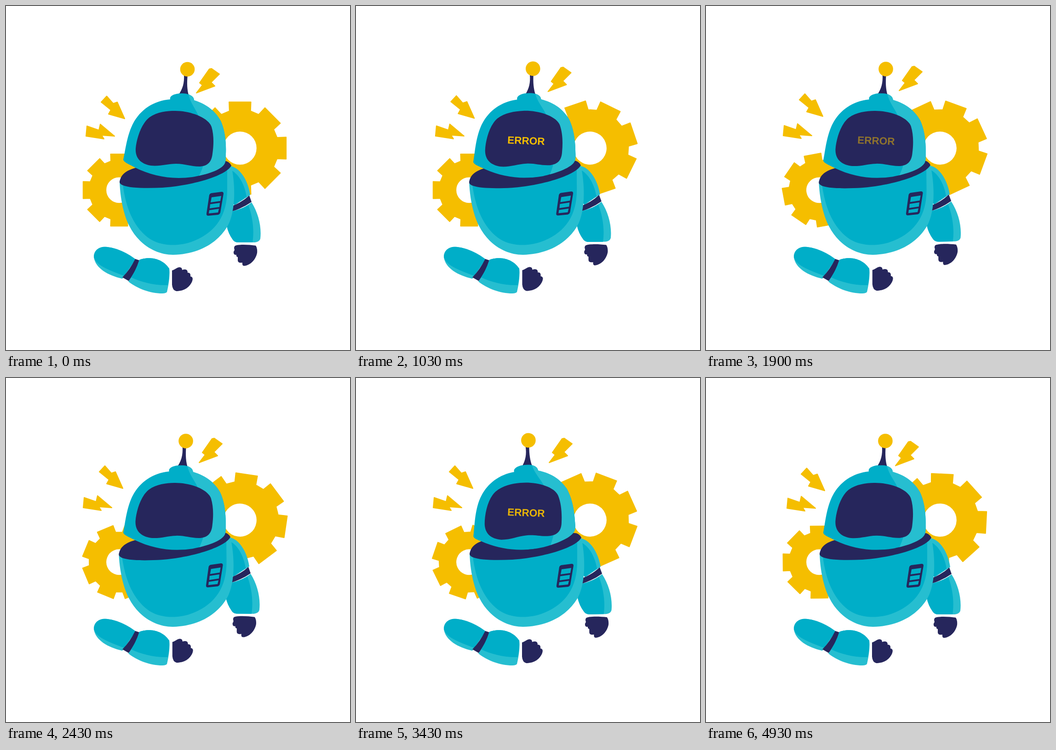
Write an HTML page that moves like this. It is 748 by 748 pixels and loops after 5010 ms.

```html
<!DOCTYPE html>
<html lang="en">
<head>
<meta charset="utf-8">
<title>Broken robot</title>
<style>
  html, body { margin: 0; width: 100%; height: 100%; overflow: hidden; background: #fff; }
  svg { display: block; width: 100vw; height: 100vh; }
  .teal { fill: #00aec8; }
  .light { fill: #26bed0; }
  .navy { fill: #26265c; }
  .gold { fill: #f5be00; stroke: #f5be00; stroke-width: 2; stroke-linejoin: round; }
  text { font: bold 22.5px "Liberation Sans", Arial, sans-serif; fill: #f5be00; text-anchor: middle; }
</style>
</head>
<body>
<svg viewBox="0 0 748 748">
  <defs>
    <clipPath id="headShape">
      <path d="M255 334C259 318 262 285 275 258C291 226 320 206 357 203C355 196 365 190 382 190C398 190 409 196 409 205C438 214 456 230 467 250C477 272 479 300 478 322C478 332 478 340 474 345C464 359 428 368 405 372C360 378 318 370 280 351C268 344 256 340 255 334Z"/>
    </clipPath>
  </defs>

  <g class="gold">
    <path id="gearL"/>
    <path id="gearR"/>
    <path id="boltA" d="M442 137L447 136L464 148L446 166L454 174L414 189L427 172L421 167Z"/>
    <path id="boltB" d="M219 196L233 212L242 209L258 245L223 235L228 226L207 209Z"/>
    <path id="boltC" d="M176 261L202 270L205 257L236 283L208 281L213 289L174 283Z"/>
  </g>

  <g id="body">
    <g id="arm">
      <path class="light" d="M486 348C508 350 526 378 531 411L497 433L484 420Z"/>
      <path class="teal" d="M491 358C506 366 519 388 523 415L497 433L486 420Z"/>
      <path class="navy" d="M488 436Q512 428 529 412L534 426Q514 440 490 447Z"/>
      <path class="light" d="M490 447Q516 441 534 427C549 451 556 480 553 506Q551 513 541 514L505 514Q497 514 493 508Q483 494 480 478Z"/>
      <path class="teal" d="M490 447Q512 442 527 433C537 460 540 490 536 514L505 514Q497 514 493 508Q483 494 480 478Z"/>
      <path class="navy" d="M499 521C508 518 528 519 543 521Q547 527 546 537C543 552 531 564 518 565Q513 565 514 558Q503 560 504 551L504 546Q500 545 501 541Q494 542 495 534Q498 531 496 527Q496 522 499 521Z"/>
    </g>
    <path class="light" d="M247 380C248 420 257 457 268 478C289 520 328 541 363 541C418 540 459 516 481 480C497 453 501 400 490 347Z"/>
    <path class="teal" d="M254 388C260 436 276 478 308 503C334 523 376 524 408 511C456 492 481 455 481 400L481 355Z"/>
    <path class="navy" d="M247 383C249 364 266 355 290 350L468 338Q483 334 490 347C478 370 402 391 340 395C297 397 249 396 247 383Z"/>
    <path class="navy" d="M446 407L469 404Q473 404 473 408L466 449Q465 453 461 454L440 456Q435 456 436 451L442 411Q443 408 446 407Z"/>
    <path class="teal" d="M447 416L468 413L466 424L445 427ZM444 431L465 428L464 437L443 440ZM442 444L463 441L461 449L441 451Z"/>
  </g>

  <path class="light" d="M191 546C191 530 204 522 220 524C245 527 268 540 282 551L253 593C222 586 194 570 191 546Z"/>
  <path class="teal" d="M191 546C191 530 204 522 220 524C245 527 268 540 282 551L257 587C232 577 196 566 191 546Z"/>
  <path class="navy" d="M281 550L290 553Q283 577 267 598L253 590Q269 574 281 550Z"/>
  <path class="light" d="M290 552C304 546 337 544 355 571C357 586 353 610 350 622Q347 625 340 625C314 625 286 615 266 599Q282 578 290 552Z"/>
  <path class="teal" d="M290 552C304 546 337 544 355 571Q356 589 352 607C322 608 293 600 272 590Q284 572 290 552Z"/>
  <path id="hand" class="navy" d="M361 575C368 573 370 569 377 568Q383 568 383 574Q395 570 395 580Q402 579 401 588Q408 589 405 598C400 611 388 620 370 620Q362 618 361 606Z"/>

  <g id="head">
    <path class="navy" d="M375 193C384 181 388 167 387 150L395 150C393 168 394 182 397 193Z"/>
    <circle cx="394.5" cy="137.6" r="15.8" fill="#f5be00"/>
    <g clip-path="url(#headShape)">
      <path class="teal" d="M240 180H490V385H240Z"/>
      <path class="light" d="M395 180C397 208 412 222 418 238L440 300Q434 346 412 385H490V180Z"/>
    </g>
    <path class="navy" d="M282 310C284 288 294 256 312 242C329 230 350 228 368 228C400 228 440 242 447 263C452 280 452 300 449 321C447 340 438 348 421 349C400 349 390 343 370 343C350 343 336 349 315 347C292 343 281 330 282 310Z"/>
  </g>
  <text id="error" x="370" y="300.5" transform="rotate(2.2 370 293)">ERROR</text>
</svg>

<script>
  const LOOP = 5010;
  const $ = id => document.getElementById(id);

  // Poses at these ticks (20 per second); each track is eased between them.
  const TICKS = [0, 12, 28, 49, 69, 84, 99];
  const TRACKS = {
    head:  [0, -5.4, -1, -1, -5.6, -3.7, -1.3],
    body:  [0, 0, -0.6, -0.6, 0, 0, 0],
    arm:   [0, 0.8, -1.3, 0.7, -1, -1.9, 0],
    gearL: [0, 0, 0, -22.7, -26, -26, -0.5],
    gearR: [0, 20, 30.5, 8.3, 20.8, 14.9, 2.9],
    boltA: [0, 0, 1, 1, 1, 1, -0.35],
    boltB: [0, -1, 1, 1, 1, 1, 0],
    boltC: [0, -1, 1, 1, 1, 1, -0.35]
  };
  const PIVOTS = { head: [363, 337], body: [363, 541], arm: [500, 360] };
  const GEARS = { gearL: [246, 400.3, 0.78], gearR: [508.8, 309, 1] };
  const DRIFT = { boltA: [6, -5], boltB: [-4, -5], boltC: [-6, -1] };

  function gearPath(scale, teeth = 8) {
    const tooth = [[-23, -80.5], [-23.7, -100.3], [23.7, -100.3], [23, -80.5]];
    const pts = [];
    for (let i = 0; i < teeth; i++) {
      const a = i * 2 * Math.PI / teeth, c = Math.cos(a), s = Math.sin(a);
      for (const [x, y] of tooth)
        pts.push([(x * c - y * s) * scale, (x * s + y * c) * scale].map(v => v.toFixed(2)));
    }
    const r = 37 * scale;
    return `M${pts.join('L')}ZM${r} 0A${r} ${r} 0 1 0 ${-r} 0A${r} ${r} 0 1 0 ${r} 0Z`;
  }

  for (const id in GEARS) {
    $(id).setAttribute('d', gearPath(GEARS[id][2]));
    $(id).setAttribute('fill-rule', 'evenodd');
  }

  function sample(track, tick) {
    let i = 0;
    while (i < TICKS.length - 2 && tick >= TICKS[i + 1]) i++;
    const u = (tick - TICKS[i]) / (TICKS[i + 1] - TICKS[i]);
    return track[i] + (track[i + 1] - track[i]) * u * u * (3 - 2 * u);
  }

  // Ticks last 30 ms and 70 ms in turn.
  const tickAt = ms => Math.min(99, 2 * Math.floor(ms / 100) + (ms % 100 >= 30 ? 1 : 0));

  const place = (id, value) => $(id).setAttribute('transform', value);

  function draw(tick) {
    const at = id => sample(TRACKS[id], tick);
    for (const id in PIVOTS) place(id, `rotate(${at(id)} ${PIVOTS[id].join(' ')})`);
    for (const id in GEARS) place(id, `translate(${GEARS[id][0]} ${GEARS[id][1]}) rotate(${at(id)})`);
    for (const id in DRIFT) {
      const k = at(id);
      place(id, `translate(${DRIFT[id][0] * k} ${DRIFT[id][1] * k})`);
    }
    const tilt = at('body');
    place('hand', `translate(${-1.3 * tilt} ${1.6 * tilt})`);
    const glow = 0.54 * (1 - Math.cos(2 * Math.PI * tick / 50));
    $('error').setAttribute('opacity', glow < 0.02 ? 0 : Math.min(1, glow));
  }

  const start = performance.now();
  function loop() {
    draw(tickAt((performance.now() - start) % LOOP));
    requestAnimationFrame(loop);
  }
  draw(0);
  requestAnimationFrame(loop);
</script>
</body>
</html>
```
